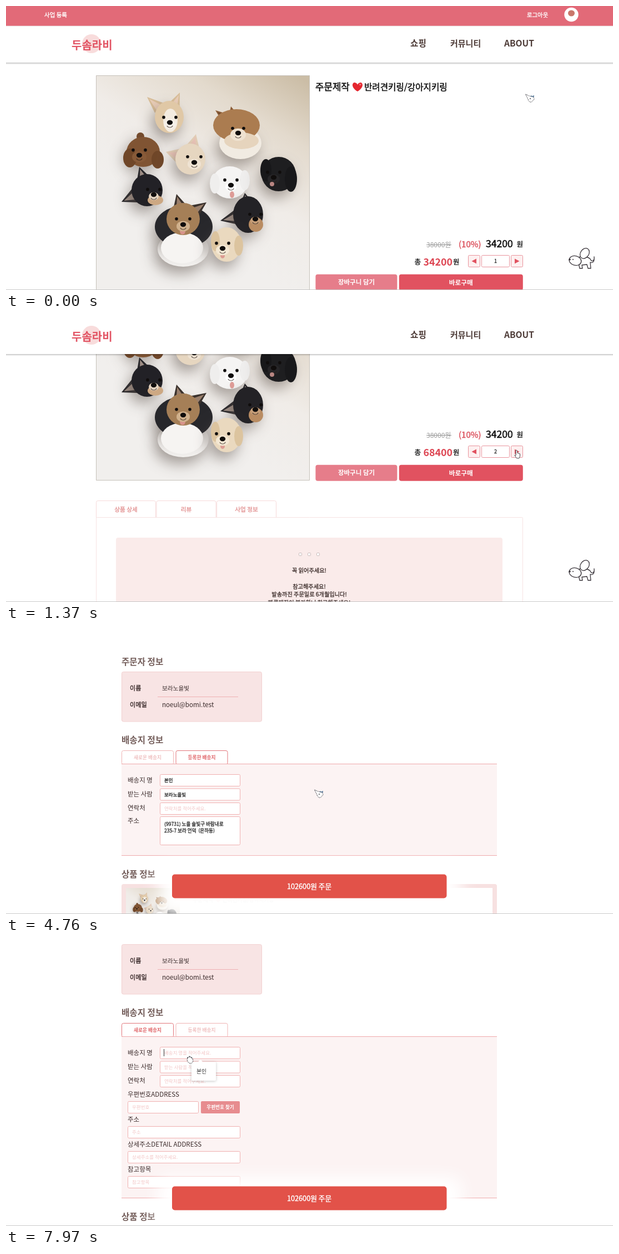
Recreate the animation shown at these times as an HTML page with a canvas. Size 1093x512 px, loop 8000 ms.

```html
<!DOCTYPE html>
<html lang="ko">
<head>
<meta charset="utf-8">
<style>
html, body { margin: 0; width: 100%; height: 100%; overflow: hidden; background: #fff; }
canvas { display: block; width: 1093px; height: 512px; }
</style>
</head>
<body>
<canvas></canvas>
<script>
const W = 1093, H = 512, LOOP = 8000;
const FONT = '"Noto Sans CJK KR", "Noto Sans CJK", "Noto Sans CJK JP", sans-serif';
const RED = '#e15260', INK = '#3a2b2b', SOFT = '#f3c6c6', EDGE = '#f0b0b0';
const USER = '보라노을빛', PHONE = '00047258316';

const canvas = document.querySelector('canvas');
const c = canvas.getContext('2d');
const dpr = window.devicePixelRatio || 1;
canvas.width = W * dpr;
canvas.height = H * dpr;

// ---- timing: the screen refreshes in short bursts ----
const run = (a, b, n) => Array.from({ length: n }, (_, i) => a + (b - a) * i / (n - 1));
const ticks = [
  0, 140, 200, 270, 360, 460, 560, 700, 760,
  ...run(910, 1370, 7), ...run(1850, 1980, 3), ...run(2180, 2540, 6),
  2710, 2770, 2970, 3060, 3350, 3380, 3580,
  ...run(4400, 4760, 6), ...run(4830, 5000, 3), 5140, 5210,
  ...run(5370, 5480, 3), ...run(5710, 5950, 5),
  ...run(6090, 6360, 5), ...run(6420, 6890, 8),
  ...run(6980, 7280, 5), ...run(7430, 7970, 8)
];
const snap = t => ticks.findLast(k => k <= t);

// linear path through [time, ...values]
function along(t, keys) {
  const i = keys.findIndex(k => k[0] > t);
  if (i < 0) return keys[keys.length - 1].slice(1);
  if (!i) return keys[0].slice(1);
  const a = keys[i - 1], b = keys[i], u = (t - a[0]) / (b[0] - a[0]);
  return a.slice(1).map((v, j) => v + (b[j + 1] - v) * u);
}

const shopScroll = [[70, 0], [140, 30], [200, 78.6], [270, 132], [360, 190], [460, 219]];
const orderScroll = [[4328, -71], [4760, 0], [4915, 60], [5000, 71]];
const wobble = [[2320, 0], [2400, -.5], [2540, .5], [2710, -.5], [2770, .5], [2970, -.5], [3060, 0]];
const cursorPath = [
  [460, 935, 158], [560, 936, 184], [700, 936, 203], [760, 932, 221],
  [910, 929, 226], [1065, 916, 237], [2180, 914, 240], [2400, 842, 272],
  [2540, 838, 273], [3060, 838, 268], [3350, 838, 245], [3380, 836, 238],
  [3580, 555, 287], [4760, 555, 287], [4830, 540, 283], [5000, 362, 244],
  [5210, 347, 243], [5710, 350, 248], [5950, 374, 278], [6360, 382, 275],
  [6890, 241, 155], [7280, 257, 163], [7430, 262, 166], [7970, 325, 205]
];

// ---- drawing helpers ----
function text(s, x, y, size, color = INK, align = 'left', weight = 400) {
  c.font = `${weight} ${size}px ${FONT}`;
  c.textAlign = align;
  c.textBaseline = 'middle';
  c.fillStyle = color;
  c.fillText(s, x, y);
}
const bold = (s, x, y, size, color, align) => text(s, x, y, size, color, align, 700);

// regular letters with a hairline outline, between regular and bold
function medium(s, x, y, size, color = INK, align = 'left') {
  text(s, x, y, size, color, align);
  c.strokeStyle = color;
  c.lineWidth = size * .032;
  c.lineJoin = 'round';
  c.strokeText(s, x, y);
}

function box(x, y, w, h, r, fill, stroke) {
  const d = stroke ? .5 : 0;
  c.beginPath();
  c.roundRect(x + d, y + d, w - 2 * d, h - 2 * d, r);
  if (fill) { c.fillStyle = fill; c.fill(); }
  if (stroke) { c.strokeStyle = stroke; c.lineWidth = 1; c.stroke(); }
}
function rect(x, y, w, h, fill) { c.fillStyle = fill; c.fillRect(x, y, w, h); }
function oval(x, y, rx, ry, fill) {
  c.beginPath();
  c.ellipse(x, y, rx, ry, 0, 0, 7);
  c.fillStyle = fill;
  c.fill();
}
function poly(fill, ...p) {
  c.beginPath();
  p.forEach(([x, y]) => c.lineTo(x, y));
  c.closePath();
  c.fillStyle = fill;
  c.fill();
}
function shadow(color, blur, dx, dy) {
  c.shadowColor = color;
  c.shadowBlur = blur * dpr;
  c.shadowOffsetX = dx * dpr;
  c.shadowOffsetY = dy * dpr;
}
function heart(x, y, w) {
  c.save();
  c.translate(x, y);
  c.scale(w / 20, w / 20);
  c.beginPath();
  c.moveTo(0, 8.5);
  c.bezierCurveTo(-15, -1, -9, -11, -3.5, -8);
  c.quadraticCurveTo(-1, -7, 0, -4.5);
  c.quadraticCurveTo(1, -7, 3.5, -8);
  c.bezierCurveTo(9, -11, 15, -1, 0, 8.5);
  c.fillStyle = '#e5262f';
  c.fill();
  oval(5, -4.5, 2, 1.5, '#f4767a');
  c.restore();
}

// ---- product photo ----
function ear(x, y, r, tx, ty, fur, inner) {
  const d = Math.hypot(tx - x, ty - y);
  const px = (y - ty) / d * r, py = (tx - x) / d * r;
  const mx = x + (tx - x) * .45, my = y + (ty - y) * .45;
  poly(fur, [tx, ty], [mx + px, my + py], [mx - px, my - py]);
  poly(inner, [x + (tx - x) * .9, y + (ty - y) * .9], [mx + px * .55, my + py * .55], [mx - px * .55, my - py * .55]);
}
// fluffy blob with a soft shade cast to the lower left
function fluff(x, y, rx, ry, fill, k) {
  c.save();
  shadow('rgba(96,86,78,.55)', 26 * k, -6 * k, 12 * k);
  oval(x, y, rx, ry, fill);
  c.restore();
}
function face(nx, ny, gap, snout, color) {
  oval(nx, ny + 3, snout, snout * .8, color);
  for (const s of [-1, 1]) oval(nx + s * gap, ny - gap * .85, 2.8, 2.8, '#100d0c');
  oval(nx, ny, 5.2, 4.2, '#100d0c');
  c.beginPath();
  c.arc(nx, ny + 3, 6, .5, 2.6);
  c.strokeStyle = 'rgba(40,28,24,.7)';
  c.lineWidth = 1.2;
  c.stroke();
}
function photo(x, y, w, h) {
  const k = w / 385;
  c.save();
  c.beginPath();
  c.rect(x, y, w, h);
  c.clip();
  c.translate(x, y);
  c.scale(k, h / 387);
  c.translate(-162, -125);
  const g = c.createLinearGradient(500, 110, 320, 400);
  g.addColorStop(0, '#cbbda6');
  g.addColorStop(.3, '#e3dacd');
  g.addColorStop(.65, '#f0ece8');
  g.addColorStop(1, '#f1efed');
  rect(162, 125, 385, 387, g);

  // corgi
  ear(294, 200, 12, 254, 164, '#d8bd98', '#e9cdb8');
  ear(294, 200, 11, 313, 156, '#d8bd98', '#e9cdb8');
  fluff(294, 200, 26, 29, '#e0c8a6', k);
  oval(296, 206, 13, 21, '#f3ebe0');
  face(295, 210, 11, 11, '#f6f0e8');

  // spitz
  fluff(422, 247, 38, 29, '#f1ebe2', k);
  ear(414, 217, 10, 377, 188, '#8e5f39', '#6b452b');
  ear(414, 217, 10, 405, 181, '#8e5f39', '#6b452b');
  oval(415, 215, 42, 29, '#ab7c50');
  oval(424, 243, 31, 15, '#e6d4bd');
  face(418, 229, 10, 14, '#efe2d0');

  // brown poodle
  fluff(242, 235, 7, 7, '#754a2b', k);
  fluff(247, 263, 30, 27, '#805433', k);
  oval(223, 274, 12, 17, '#6f4628');
  oval(273, 277, 11, 16, '#6f4628');
  face(240, 269, 11, 13, '#875a38');

  // small cream dog
  ear(331, 276, 14, 288, 263, '#e2cdb5', '#e8c3b6');
  ear(331, 276, 13, 342, 231, '#e2cdb5', '#e8c3b6');
  fluff(332, 276, 27, 28, '#e6d6c0', k);
  face(339, 282, 12, 12, '#efe3d3');

  // white dog
  fluff(403, 318, 32, 29, '#f5f4f3', k);
  oval(376, 320, 9, 18, '#efeeed');
  oval(430, 314, 9, 18, '#efeeed');
  oval(407, 340, 4, 6, '#df9c97');
  face(405, 323, 11, 10, '#ffffff');

  // black poodle
  fluff(491, 303, 31, 31, '#1e1e20', k);
  oval(468, 296, 10, 20, '#18181a');
  oval(513, 312, 11, 23, '#18181a');
  face(482, 309, 11, 11, '#262527');
  oval(479, 321, 4, 4, '#b98682');

  // black and tan, left
  ear(254, 332, 14, 208, 353, '#232226', '#a08f86');
  ear(254, 332, 13, 240, 290, '#232226', '#a08f86');
  fluff(254, 332, 28, 29, '#222126', k);
  oval(269, 350, 14, 9, '#cda883');
  face(266, 340, 11, 9, '#e3d3c0');

  // collie
  fluff(319, 438, 46, 32, '#f5f3f1', k);
  fluff(320, 398, 52, 38, '#27272b', k);
  oval(317, 436, 38, 28, '#f6f4f2');
  ear(319, 384, 13, 307, 339, '#3b322d', '#9a7f6c');
  ear(319, 384, 13, 361, 354, '#3b322d', '#9a7f6c');
  oval(319, 384, 30, 29, '#a57f57');
  oval(318, 406, 5, 6, '#d8938c');
  face(319, 394, 12, 12, '#d0b18d');

  // black and tan, right
  ear(436, 376, 13, 386, 387, '#242327', '#a08f86');
  ear(436, 376, 13, 430, 337, '#242327', '#a08f86');
  fluff(436, 376, 27, 33, '#232226', k);
  oval(450, 394, 13, 13, '#b98c62');
  face(449, 384, 10, 9, '#c59d77');

  // cream puppy
  fluff(397, 430, 27, 31, '#ead9bf', k);
  oval(377, 424, 8, 18, '#dcc49f');
  oval(419, 432, 8, 18, '#dcc49f');
  oval(390, 450, 4, 5, '#dc9b92');
  face(390, 437, 11, 12, '#f3e7d3');
  c.restore();
}

function doodle() {
  c.save();
  c.lineWidth = 1.3;
  c.lineJoin = c.lineCap = 'round';
  c.strokeStyle = '#39343a';
  c.fillStyle = '#fff';
  c.beginPath();
  c.moveTo(1030, 453);
  c.quadraticCurveTo(1046, 450, 1052, 456);
  c.bezierCurveTo(1055, 463, 1060, 459, 1059, 452);
  c.quadraticCurveTo(1060, 465, 1052, 462);
  c.lineTo(1053, 473); c.lineTo(1048, 473); c.lineTo(1046, 466);
  c.lineTo(1037, 467); c.lineTo(1038, 473); c.lineTo(1033, 473); c.lineTo(1031, 464);
  c.fill();
  c.stroke();
  c.beginPath();
  c.ellipse(1042, 446, 7.5, 10, .6, 0, 7);
  c.fill();
  c.stroke();
  c.beginPath();
  c.ellipse(1025, 459, 11, 8.5, .25, 0, 7);
  c.fill();
  c.stroke();
  oval(1015, 457, 1.8, 1.5, '#39343a');
  oval(1021, 457, 1, 1, '#39343a');
  c.restore();
}

// ---- shop page ----
function shop(s) {
  const [scroll] = along(s, shopScroll);
  const qty = s < 1140 ? 1 : s < 1850 ? 2 : 3;
  c.save();
  c.translate(0, -scroll);
  photo(162, 125, 385, 387);
  box(162, 125, 385, 387, 0, null, '#c6c1ba');

  medium('주문제작', 557, 146, 16.8, '#111');
  heart(633, 146, 19);
  medium('반려견키링/강아지키링', 645, 146, 15.6, '#111');

  text('38000원', 757, 430, 12, '#999');
  rect(757, 430, 45, 1, '#999');
  medium('(10%)', 815, 429, 15, '#dc5560');
  medium('34200', 864, 428.5, 17.6, '#111');
  bold('원', 931, 429, 12.5, '#222', 'right');

  const total = String(34200 * qty);
  bold(total, 804, 461.5, 17.8, '#dd4552', 'right');
  medium('총', 747 - (total.length - 5) * 10.4, 461.5, 12.5, '#222', 'right');
  medium('원', 805, 461.5, 12.5, '#222');

  for (const [x, dir] of [[832, -1], [909, 1]]) {
    box(x, 449, 22, 22, 2, '#fdf0f0', '#e9949d');
    const m = x + 11;
    poly(RED, [m - 4 * dir, 455.5], [m - 4 * dir, 464.5], [m + 4.5 * dir, 460]);
  }
  box(856, 449, 51, 22, 2, '#fff', '#e9949d');
  medium(qty, 881.5, 460, 9, '#222', 'center');

  box(557.4, 483.7, 147, 29, 4, '#e67d8a');
  bold('장바구니 담기', 631, 498, 11.5, '#fff', 'center');
  c.save();
  c.translate(819.3, 498.2);
  c.rotate(along(s, wobble)[0] * Math.PI / 180);
  box(-111.5, -14.5, 223, 29, 4, RED);
  bold('바로구매', 0, 0, 11.7, '#fff', 'center');
  c.restore();

  ['상품 상세', '리뷰', '사업 정보'].forEach((s, i) => {
    box(162 + i * 108.5, 548, 108, 34, 3, '#fff', '#f6dada');
    medium(s, 216 + i * 108.5, 563.5, 10.6, '#e39494', 'center');
  });
  box(162, 578, 769, 400, 2, '#fff', '#f6e2e2');
  box(198, 615, 696, 300, 4, '#faebea');
  for (const x of [527, 543, 559]) box(x, 642, 6, 6, 1, '#fff', '#c9b9b9');
  [[674, '꼭 읽어주세요!'], [703, '참고해주세요!'], [717.5, '발송까진 주문일로 6개월입니다!'], [732, '빠른제작이 불가하니 참고해주세요!']]
    .forEach(([y, s]) => medium(s, 546, y, 10.2, '#3f302e', 'center'));

  rect(0, 0, W, 35.5, '#e26a78');
  medium('사업 등록', 69, 16, 10.5, '#fff');
  medium('로그아웃', 938, 16, 10.4, '#fff');
  oval(1018, 15.5, 12.7, 12.7, '#fff');
  oval(1018, 13, 6, 5.5, '#c9776b');
  c.restore();

  const top = Math.max(0, 37 - scroll);
  c.save();
  shadow('rgba(0,0,0,.35)', 3, 0, 1);
  rect(-10, top, W + 20, 65, '#fff');
  c.restore();
  if (top > 0) rect(0, 0, W, Math.max(0, 35.5 - scroll), '#e26a78');
  if (top > 35) {
    medium('사업 등록', 69, 16, 10.5, '#fff');
    medium('로그아웃', 938, 16, 10.4, '#fff');
    oval(1018, 15.5, 12.7, 12.7, '#fff');
    oval(1018, 13, 6, 5.5, '#c9776b');
  }
  oval(154, top + 31, 17, 17, '#f8dcdc');
  bold('두솜라비', 118, top + 33, 20, '#e25565');
  bold('쇼핑', 728, top + 30.5, 15.7, '#4e3c38');
  bold('커뮤니티', 800, top + 30.5, 15, '#4e3c38');
  bold('ABOUT', 897, top + 30.5, 15.6, '#4e3c38');
  doodle();
}

// ---- order page ----
function field(x, y, w, value, hint, h = 22, fill = '#fff') {
  box(x, y, w, h, 2, fill, EDGE);
  if (value) medium(value, x + 8, y + 11, 8.5, '#222');
  else text(hint, x + 8, y + 11, 8.5, SOFT);
}
function suggest(y, value, w) {
  c.save();
  shadow('rgba(0,0,0,.22)', 5, 0, 1);
  box(334, y, w, 34, 2, '#fff');
  c.restore();
  poly('#fff', [345, y + 1], [350, y - 4], [355, y + 1]);
  text(value, 343, y + 17, 9.8, '#333');
}
const caret = (x, y) => rect(x, y, 1, 13, '#333');

function order(s) {
  const [scroll] = along(s, orderScroll);
  const fresh = s >= 7055;
  const filled = s >= 5830, popup = s >= 5425 && s < 6090;
  c.save();
  c.translate(0, -scroll);

  const title = (t, y) => bold(t, 208, y, 15.6, '#755f5c');
  title('주문자 정보', 57);
  box(208, 75, 253, 90.5, 3, '#f8e4e4', '#f2d0d0');
  medium('이름', 223, 105, 11.1);
  medium('이메일', 223, 135, 11.1);
  text(USER, 281, 105, 10.7);
  rect(273, 120, 145, 1, '#efb0b3');
  text('noeul@bomi.test', 281, 135, 11.6);

  title('배송지 정보', 198);
  const end = fresh ? 533 : 407;
  rect(208, 241, 676, end - 241, '#fcf3f3');
  ['새로운 배송지', '등록한 배송지'].forEach((t, i) => {
    const on = (i === 0) === fresh, x = 208 + i * 97.5;
    box(x, 217, 94, 26, 3, '#fff', on ? '#e2757a' : '#f0b4b4');
    text(t, x + 47, 229.5, 8.7, on ? '#e0666a' : '#e8a2a2', 'center', on ? 700 : 400);
  });
  rect(208, 241, 676, 2, '#fcf3f3');
  rect(208, 241, 676, 1, '#efa9ab');
  rect(208, end - 1, 676, 1, '#efa9ab');

  const label = (t, y) => text(t, 219, y, 11.5);
  label('배송지 명', 271);
  label('받는 사람', 296);
  label('연락처', 321);
  field(277, 260, 145, fresh ? '' : '본인', '배송지 명을 적어주세요.');
  field(277, 285.5, 145, fresh ? '' : USER, '받는 사람을 적어주세요.');
  field(277, 311, 145, !fresh && filled ? PHONE : '', '연락처를 적어주세요.', 22, !fresh && filled ? '#e8effc' : '#fff');
  if (fresh) {
    label('우편번호ADDRESS', 345.5);
    field(219, 358, 128, '', '우편번호');
    box(351, 358, 70, 22, 2, '#e78c8f');
    bold('우편번호 찾기', 386, 369, 8.6, '#fff', 'center');
    label('주소', 391);
    field(219, 403, 203, '', '주소');
    label('상세주소DETAIL ADDRESS', 436);
    field(219, 448, 203, '', '상세주소를 적어주세요.');
    label('참고항목', 481);
    field(219, 493, 203, '', '참고항목');
  } else {
    label('주소', 343.5);
    box(277, 336, 145, 52, 2, '#fff', EDGE);
    medium('(99731) 노을 솔빛구 바람내로', 285, 349.5, 8.6, '#222');
    medium('235-7 보라 언덕  (은하동)', 285, 361.5, 8.6, '#222');
  }

  c.translate(0, end - 407);
  title('상품 정보', 440);
  box(208, 458, 676, 116, 4, '#f7e1e1');
  rect(216, 465, 660, 101, '#fff');
  photo(216, 465, 97, 101);
  medium('주문제작', 336, 486, 10.2, '#111');
  heart(382, 486, 12);
  medium('반려견키링/강아지키링', 390, 486, 9.6, '#111');
  medium('34200', 855, 526, 15.5, '#4a4040', 'right');
  bold('3개', 855, 546, 13, '#e5776f', 'right');
  c.restore();

  // floating order button with a white glow
  c.save();
  shadow('#fff', 30, 2000, 8);
  box(299 - 26 - 2000, 441 - 26, 495 + 52, 43 + 52, 18, '#fff');
  c.restore();
  box(299, 440.5, 494.5, 43, 5, '#e25249');
  medium('102600원 주문', 546, 462, 12.7, '#fff', 'center');

  if (popup) suggest(266, PHONE, 86);
  if (s >= 5370 && s < 5830) caret(284, 244);
  if (filled && !fresh) caret(335.5, 244);
  if (s >= 7800) caret(284, 193);
  if (s >= 7890) suggest(216, '본인', 44);
}

// ---- cursors ----
function cursor(s) {
  const [x, y] = along(s, cursorPath);
  const kind = s < 980 ? 'bow' : s < 3580 ? 'hand' : s < 4915 ? 'bow' : s < 6750 ? 'paw' : s < 7430 ? 'hand' : 'paw';
  c.save();
  c.translate(x, y);
  c.lineWidth = 1;
  c.lineJoin = 'round';
  c.strokeStyle = '#4a4a50';
  c.fillStyle = '#fff';
  c.beginPath();
  if (kind === 'bow') {
    c.moveTo(.5, 1);
    c.lineTo(8, 4.5);
    c.quadraticCurveTo(16, 5, 16, 10);
    c.lineTo(11, 15.5);
    c.quadraticCurveTo(6, 15, 5, 10);
    c.closePath();
    c.setLineDash([2, 1]);
  } else if (kind === 'hand') {
    c.moveTo(2.5, 1);
    c.quadraticCurveTo(4, -.5, 5, 1.5);
    c.lineTo(5.5, 5.5);
    c.lineTo(10, 7);
    c.lineTo(10, 11.5);
    c.lineTo(8.5, 15);
    c.lineTo(4, 15);
    c.lineTo(.5, 9.5);
    c.lineTo(2.8, 9.5);
    c.closePath();
  } else {
    c.ellipse(6.5, 8, 5, 6, -.5, 0, 7);
    c.setLineDash([2.5, 1]);
  }
  c.fill();
  c.stroke();
  if (kind === 'bow') {
    poly('#56789a', [10, 3], [12.5, 4.5], [16, 3], [15.5, 7], [12.5, 5], [10.5, 6]);
    oval(9, 9, 1, 1, '#4a4a50');
  }
  if (kind === 'paw') for (const i of [0, 1, 2]) oval(2 + i * 3.6, 3.5 - i % 2 * 2, 1.1, 1.1, '#4a4a50');
  c.restore();
}

function frame(now) {
  const s = snap(now % LOOP);
  c.setTransform(dpr, 0, 0, dpr, 0, 0);
  rect(0, 0, W, H, '#fff');
  (s < 3580 ? shop : order)(s);
  cursor(s);
  rect(0, 511, W, 1, '#c8c8c8');
}

const start = performance.now();
(function loop() {
  frame(performance.now() - start);
  requestAnimationFrame(loop);
})();
</script>
</body>
</html>
```
